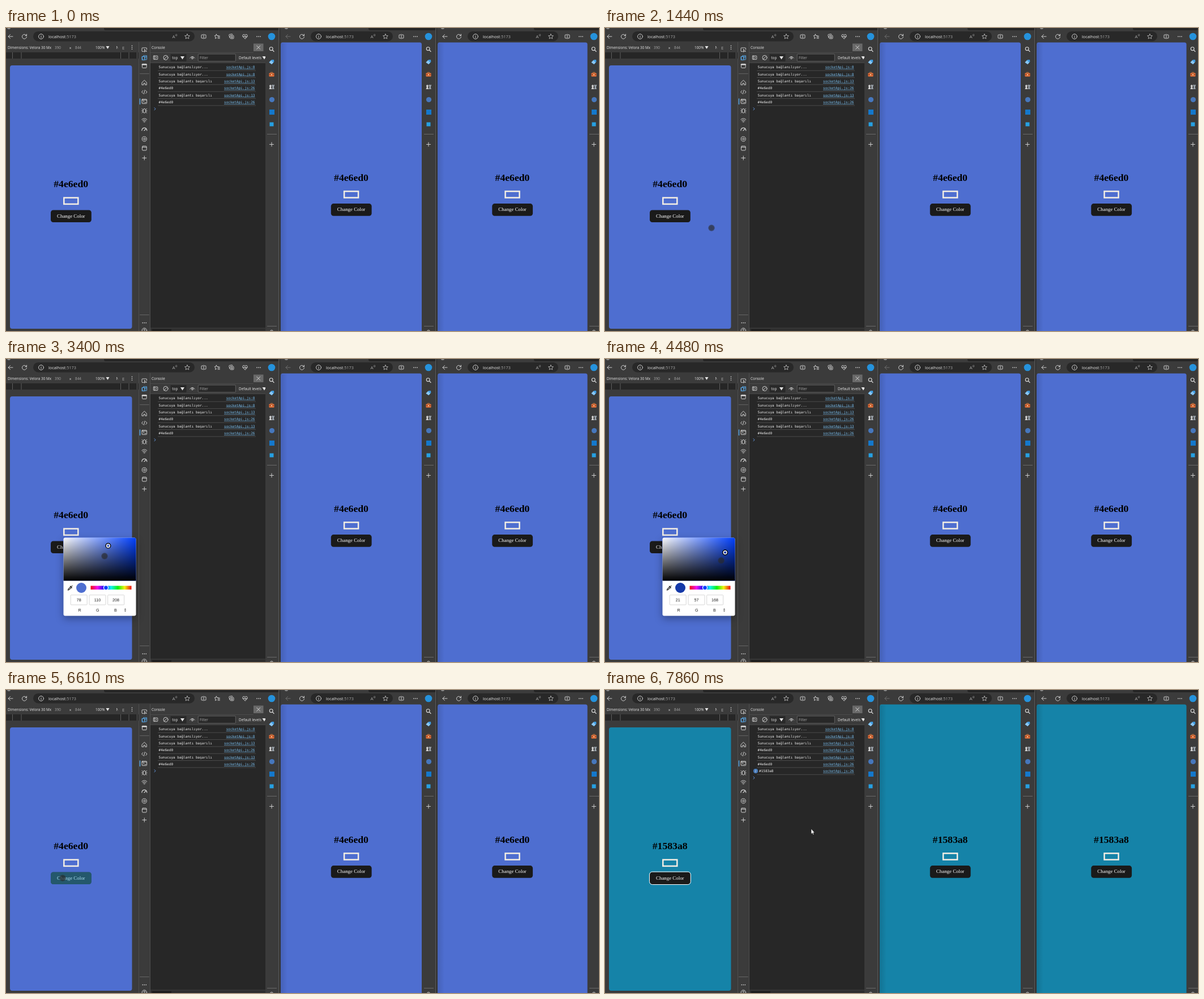
Recreate the animation shown at these times as an HTML page. Size 1047x535 px, loop 8 s.

```html
<!DOCTYPE html>
<html lang="en">
<head>
<meta charset="utf-8">
<title>Shared colour demo</title>
<style>
  html, body { margin: 0; width: 100%; height: 100%; overflow: hidden; background: #3b3b3b; }
  svg { display: block; width: 100vw; height: 100vh; --page: #4e6ed0; }
  text { white-space: pre; }
  .ui { font-family: "Open Sans", "Noto Sans", sans-serif; font-size: 6.4px; fill: #e8e8e8; }
  .url { font-size: 7.25px; }
  .dim { fill: #a6a6a6; }
  .mono { font-family: "DejaVu Sans Mono", monospace; font-size: 6.04px; fill: #f0f0f0; }
  .link { fill: #7cc0f0; text-decoration: underline; }
  .serif { font-family: "Liberation Serif", serif; text-anchor: middle; }
  .hex { font-size: 17.7px; font-weight: bold; }
  .label { font-size: 8.87px; fill: #fff; }
  .num { font-family: "Liberation Sans", sans-serif; font-size: 7.2px; text-anchor: middle; fill: #222; }
  .line { fill: none; stroke: #dcdcdc; stroke-width: .9; stroke-linecap: round; stroke-linejoin: round; }
  .page { fill: var(--page); }
  #picker { filter: drop-shadow(0 5px 7px rgba(0, 0, 0, .32)); }
</style>
</head>
<body>
<svg viewBox="0 0 1047 535" preserveAspectRatio="none">
  <defs>
    <linearGradient id="white"><stop stop-color="#fff"/><stop offset="1" stop-color="#fff" stop-opacity="0"/></linearGradient>
    <linearGradient id="black" x2="0" y2="1"><stop stop-opacity="0"/><stop offset="1"/></linearGradient>
    <linearGradient id="edge"><stop stop-opacity=".12"/><stop offset="1" stop-opacity="0"/></linearGradient>
    <linearGradient id="hues"></linearGradient>
    <radialGradient id="dot"><stop stop-color="#282828" stop-opacity=".7"/><stop offset=".75" stop-color="#282828" stop-opacity=".64"/><stop offset="1" stop-color="#282828" stop-opacity=".2"/></radialGradient>
    <clipPath id="top"><path d="M101.5 391.5V318.5a3 3 0 0 1 3-3H226.5a3 3 0 0 1 3 3V391.5Z"/></clipPath>
    <clipPath id="dims"><path d="M0 25H80V44H0Z"/></clipPath>
    <clipPath id="levels"><path d="M405 44H458V61H405Z"/></clipPath>
    <clipPath id="mode"><path d="M194 25H197.5V44H194Z"/></clipPath>

    <g id="back" class="line"><path d="M4 0H-4M-.5-3.5L-4 0L-.5 3.5"/></g>
    <g id="reload" class="line"><path d="M3.6-1.6A4 4 0 1 0 4 .6M4-4V-1.4H1.4"/></g>
    <g id="info" class="line"><circle r="4.4"/><path d="M0-.4V2.2M0-2.1V-2"/></g>
    <g id="read"><text class="ui dim" x="-4" y="3" style="font-size:8px">A</text><path class="line" d="M2-3.5q1 1 0 2.2M3.6-4.2q1.5 1.6 0 3.5" style="stroke:#a6a6a6;stroke-width:.7"/></g>
    <g id="star" class="line" style="stroke:#b4b4b4"><path d="M0-4.4L1.3-1.6L4.4-1.3L2.1.8L2.8 3.9L0 2.3L-2.8 3.9L-2.1.8L-4.4-1.3L-1.3-1.6Z"/></g>
    <g id="split" class="line"><path d="M0-4V4M-1.4-3H-3.2q-.8 0-.8.8V2.2q0 .8.8.8H-1.4M1.4-3H3.2q.8 0 .8.8V2.2q0 .8-.8.8H1.4"/></g>
    <g id="favs" class="line"><path d="M2-1.3L-.6-1.6L-1.6-4.2L-2.6-1.6L-4.6-1.3L-3 .8L-3.4 3.6L-1.4 2.4M1.6-.8H4.4M1 1.2H4.4M1 3.2H4.4"/></g>
    <g id="stack" class="line"><rect x="-2" y="-1.8" width="6" height="5.6" rx="1"/><path d="M-3.2 2L-4.2-2.6q-.1-.8.6-1L1-4.4q.8 0 1 1M1-.4V2.6M-.5 1.1H2.5"/></g>
    <g id="heart" class="line"><path d="M0 4L-3.6.2Q-5-2-3.2-3.4Q-1.2-4.4 0-2.4Q1.2-4.4 3.2-3.4Q5-2 3.6.2ZM-4 .2H-1L0-1.4L1 1.6L1.8.2H4"/></g>
    <g id="dots" fill="#e0e0e0"><circle cx="-3" r=".85"/><circle r=".85"/><circle cx="3" r=".85"/></g>
    <g id="plus" class="line"><path d="M-3.5 0H3.5M0-3.5V3.5"/></g>
    <g id="find" class="line"><circle cx="-.8" cy="-.8" r="2.9" stroke-width="1.1"/><path d="M1.4 1.4L4 4" stroke-width="1.2"/></g>
    <g id="tag"><path d="M-4.5 1L0-3.6L4-3.8L4.4 0L.2 4.2Z" fill="#3f9be0"/><path d="M-4.5 1L-1-2.6L3 1.4L.2 4.2Z" fill="#8cc8f4"/></g>
    <g id="tools"><path d="M-1.8-2.2V-3.6H1.8V-2.2" fill="none" stroke="#c8733a"/><rect x="-4.6" y="-2.4" width="9.2" height="6.2" rx="1" fill="#e0703a"/><path d="M-4.6.4H4.6" stroke="#8c3418"/><rect x="-1" y="-.4" width="2" height="1.8" fill="#f4d0a0"/></g>
    <g id="chess"><path d="M-4.6 4H.4L-.8 1.2V-.4A1.9 1.9 0 1 0-3.4-.4V1.2Z" fill="#d0d0d0"/><path d="M.4 3.8H4.8L4 1V-1.4H4.8V-4H3.4V-3.2H2.4V-4H.6V-1.4H1.4V1Z" fill="#9aa2aa"/></g>

    <g id="page">
      <text class="serif hex" x="114.7" y="281">#4e6ed0</text>
      <rect id="well" class="page" x="102.3" y="299.7" width="25" height="11.2" stroke="#f3eee4" stroke-width="2.5"/>
      <rect x="79" y="321.4" width="71.8" height="21.7" rx="4.5" fill="#1a1a1a"/>
      <text class="serif label" x="114.8" y="334.8">Change Color</text>
    </g>
  </defs>

  <rect width="1047" height="535" fill="#3b3b3b"/>
  <g id="windows"></g>

  <!-- device view -->
  <rect y="43" width="234" height="11" fill="#262626"/>
  <path d="M11.5 43V54M27 43V54M202.500 43V54M217 43V54M231.500 43V54" stroke="#777" stroke-width=".7"/>
  <g class="ui">
    <text x="3" y="37" clip-path="url(#dims)">Dimensions: Velora 30 Mx</text>
    <text class="dim" x="86" y="37">390</text><text x="111.800" y="37.500">×</text><text class="dim" x="122" y="37">844</text>
    <text x="158" y="37">100%</text><path d="M176.500 32H182.500L179.500 37Z"/>
    <g clip-path="url(#mode)"><text x="194.500" y="37">N</text></g><text class="dim" x="205" y="37.500" style="font-size:8px">E</text>
    <circle cx="222.500" cy="31.200" r=".8"/><circle cx="222.500" cy="34.200" r=".8"/><circle cx="222.500" cy="37.200" r=".8"/>
  </g>
  <rect class="page" x="7" y="66" width="215.500" height="465" rx="4"/>
  <use href="#page"/>
  <rect id="tap" x="79" y="321.400" width="71.800" height="21.700" rx="4.500" fill="#33b5e5" fill-opacity=".4"/>
  <rect id="focus" x="78.500" y="321" width="72.800" height="22.500" rx="5" fill="none" stroke="#fff" stroke-width="1"/>

  <!-- colour picker -->
  <g id="picker">
    <rect x="101.500" y="315.500" width="128" height="138" rx="3" fill="#fff"/>
    <g clip-path="url(#top)">
      <rect id="hueFill" x="101" y="315" width="129" height="77"/>
      <rect x="101" y="315" width="129" height="77" fill="url(#white)"/>
      <rect x="101" y="315" width="129" height="77" fill="url(#black)"/>
    </g>
    <g id="knob" fill="none"><circle class="ring" r="4.200" stroke="#000" stroke-width="1.600"/><circle r="2.900" stroke="#fff" stroke-width="1.400"/></g>
    <path d="M109.500 408L110 406L114 402L115.400 403.400L111.400 407.400ZM113.400 401L116.400 404M115 402.200L117 400.400" fill="none" stroke="#222" stroke-width="1.100" stroke-linecap="round"/>
    <circle id="swatch" cx="133" cy="404" r="9"/>
    <rect x="149.500" y="400.500" width="72" height="6.600" fill="url(#hues)"/>
    <g id="hueKnob"><circle class="ring" r="5.700" fill="#000"/><circle r="4" stroke="#fff" stroke-width="1.300"/></g>
    <g fill="#fff" stroke="#ccc" stroke-width=".8"><rect x="114.200" y="416.700" width="29" height="17.300" rx="1"/><rect x="147" y="416.700" width="29" height="17.300" rx="1"/><rect x="179.700" y="416.700" width="29" height="17.300" rx="1"/></g>
    <g class="num">
      <text class="rgb" x="128.700" y="428">78</text><text class="rgb" x="161.500" y="428">110</text><text class="rgb" x="194" y="428">208</text>
      <text x="130" y="446">R</text><text x="161.700" y="446">G</text><text x="193.500" y="446">B</text>
    </g>
    <path d="M208.800 442.500L210.500 440.600L212.200 442.500ZM208.800 444.200L210.500 446.100L212.200 444.200Z" fill="#333"/>
  </g>

  <!-- developer tools -->
  <path d="M234.500 25V535M254.500 25V535" stroke="#555" stroke-width=".8"/>
  <g class="line">
    <path d="M243 41.500H241q-1 0-1-1V36q0-1 1-1H247.500q1 0 1 1V38M244.500 38V42.500L245.800 41.200H248Z"/>
    <g stroke="#5ab0f5"><path d="M242 55H240.500V50.500H242.500V48.800H248.500V53"/><rect x="245" y="51" width="3.500" height="5" rx=".6"/><path d="M240.500 50.500H245V56.500H240.500Z"/></g>
    <rect x="240.500" y="63.500" width="7.600" height="7" rx="1"/><path d="M240.500 64.500H248" stroke-width="2"/>
    <path d="M236.500 80.700H252.500M236.500 506.500H252.500" stroke="#777" stroke-width=".7"/>
    <path d="M240.300 96L244.300 92.200L248.300 96V100.400H245.600V97.600H243V100.400H240.300Z"/>
    <path d="M241.800 110.500L239.600 113L241.800 115.500M246.800 110.500L249 113L246.800 115.500M245.200 109.500L243.400 116.500"/>
    <path d="M236.500 125V134.500" stroke="#5ab0f5" stroke-width="1.400"/>
    <rect x="240" y="125.800" width="8.600" height="7.600" rx="1"/><path d="M242 128L243.600 129.600L242 131.200M245 131.400H247M240 127.200H248.600"/>
    <rect x="242" y="142.600" width="4.600" height="7.400" rx="2.300"/><path d="M242 144.500L240 142.500M242 146.300H239.600M242 148L240 150M246.600 144.500L248.600 142.500M246.600 146.300H249M246.600 148L248.600 150"/>
    <path d="M239.800 161.600Q244.300 157.600 248.800 161.600M241.300 163.400Q244.300 160.800 247.300 163.400M242.800 165.200Q244.300 164 245.800 165.200M244.300 166.400V166.500"/>
    <path d="M239.800 181Q240.300 176.400 244.300 176.400Q248.300 176.400 248.800 181M244 181L247 178.400" stroke-width="1.200"/>
    <path d="M242.600 192H246L248.200 194V197.800L246 200H242.600L240.400 197.800V194Z"/><circle cx="244.300" cy="196" r="1.600"/>
    <rect x="240.500" y="208.500" width="7.600" height="7.600" rx="1.300"/><path d="M240.500 210.500H248"/>
    <circle cx="244.300" cy="534" r="4.200"/><path d="M243 533q0-1.500 1.300-1.500t1.300 1.300-1.300 1.400"/>
  </g>
  <use href="#plus" x="244.300" y="229.500"/><use href="#dots" x="244.300" y="520.500"/>

  <rect x="255" y="61.500" width="203" height="468.500" fill="#272727"/>
  <path d="M255 61.500H458M255 43.500H437M255 530H458" stroke="#525252" stroke-width=".7"/>
  <rect x="255" y="530.500" width="203" height="5" fill="#2d2d2d"/><rect x="258" y="531.800" width="34" height="4" fill="#1c1c1c"/>
  <rect x="437" y="27.500" width="17.500" height="13.500" fill="#696969"/>
  <path class="line" d="M442.700 31.300L448.700 37.300M448.700 31.300L442.700 37.300" stroke-width=".7"/>
  <rect x="290.500" y="46" width="28" height="13" rx="1" fill="#292929"/>
  <rect x="339.300" y="46" width="66" height="12.800" rx="1" fill="#282828" stroke="#777" stroke-width=".7"/>
  <g class="line">
    <rect x="260.400" y="49.200" width="7.400" height="6.200" rx=".6"/><path d="M262.400 49.500V55M264.500 51L266 52.300L264.500 53.600"/>
    <circle cx="282" cy="52.300" r="4"/><path d="M279.200 55.100L284.800 49.500"/>
    <path d="M324.800 53Q329 47.600 333.200 53"/><circle cx="329" cy="53.200" r="1.500"/>
  </g>
  <g class="ui">
    <text x="257" y="37">Console</text><text x="293.300" y="55">top</text><path d="M308 50H315L311.500 55.500Z"/>
    <text class="dim" x="342" y="55">Filter</text>
    <g clip-path="url(#levels)"><text x="411" y="55">Default levels</text><path d="M452.500 50H459.500L456 55.500Z"/></g>
  </g>
  <g id="log" class="mono"></g>
  <path id="prompt" class="line" d="M262 140.700L264 142.800L262 144.900" style="stroke:#6aa5f5"/>

  <g id="touch"><circle r="6" fill="url(#dot)"/></g>
  <path id="arrow" d="M0 0V9.400L2.100 7.500L3.500 10.600L5 10L3.600 7H6.200Z" fill="#fff" stroke="#111" stroke-width=".6"/>
</svg>
<script>
const $ = id => document.getElementById(id);
const all = sel => [...document.querySelectorAll(sel)];
const use = (id, x, y) => `<use href="#${id}" x="${x}" y="${y}"/>`;
const rect = (x, y, w, h, fill, rx = 0) => `<rect x="${x}" y="${y}" width="${w}" height="${h}" rx="${rx}" fill="${fill}"/>`;

// left edge, back, url bar left and right, tab end, right edge, sidebar centre
const wins = [
  { x: 0, back: 8, bar: [48, 333], tab: 173, end: 482, side: 469, fav: 5, icons: { split: 349, favs: 373, stack: 398, heart: 422, dots: 446 } },
  { x: 484, back: 498, bar: [538, 683], tab: 640, end: 759, side: 746, fav: 495, page: [485, 249], icons: { split: 698, dots: 723 } },
  { x: 761, back: 775, bar: [815, 975], tab: 932, end: 1047, side: 1038, fav: 771, page: [762, 264.6], icons: { split: 991, dots: 1015 } }
];

function drawWindow(w, i) {
  const [a, b] = w.bar, s = w.side;
  let out = rect(w.tab, -4, w.end - w.tab, 8, '#252525', 3)
    + `<circle cx="${w.fav}" cy="-1" r="3.2" fill="#888"/>`
    + rect(a, 6, b - a, 17.4, '#282828', 8.7)
    + `<g opacity="${i === 1 ? .35 : 1}">${use('back', w.back, 15)}</g>`
    + use('reload', w.back + 24.5, 15) + use('info', a + 14, 15)
    + `<text class="ui url" x="${a + 27}" y="17.7">localhost<tspan class="dim">:5173</tspan></text>`
    + use('read', b - 35.5, 15) + use('star', b - 13, 15);
  for (const id in w.icons) out += use(id, w.icons[id], 15);
  out += `<circle cx="${s}" cy="15" r="6.3" fill="#2592dc"/>`;
  ['find', 'tag', 'tools', 'chess'].forEach((id, k) => out += use(id, s, 37.5 + k * 22.2));
  out += `<circle cx="${s + .5}" cy="126.500" r="4.600" fill="#4677bd"/>`
    + rect(s - 4, 144, 9, 9, '#1478cc') + rect(s - 3.5, 166.5, 7, 7, '#26a0e2')
    + `<path d="M${s - 8} 187.500h17M${s - 8} 526.500h17" stroke="#777" stroke-width=".8"/>`
    + use('plus', s, 205.5) + `<circle class="line" cx="${s}" cy="536" r="2.500"/>`;
  if (w.page) {
    const [x, width] = w.page;
    out += `<rect class="page" x="${x}" y="25.500" width="${width}" height="515" rx="3.500"/>`
      + rect(x, 27, 12, 508, 'url(#edge)') + use('page', [494.8, 779.3][i - 1], -11.3);
  }
  if (w.end < 1047) out += rect(w.end - .5, 0, 1.2, 535, '#686868') + rect(w.end + .7, 0, 1.2, 535, '#242424');
  return out;
}
$('windows').innerHTML = wins.map(drawWindow).join('');

const link = 'socketApi.js:';
const wait = 'Sunucuya bağlanılıyor...', ok = 'Sunucuya bağlantı başarılı';
const rows = [[wait, 8], [wait, 8], [ok, 13], ['#4e6ed0', 26], [ok, 13], ['#4e6ed0', 26], ['#1583a8', 26]];
$('log').innerHTML = rows.map(([msg, n], i) => {
  const y = 71.3 + i * 12.35, last = i === 6;
  const badge = last ? `<circle cx="266" cy="${y - 2.3}" r="4.100" fill="#4579b8"/><text x="264.300" y="${y - .2}" fill="#dde" style="font-size:5.500px">2</text>` : '';
  return `<g ${last ? 'id="newRow"' : ''}>${badge}<text x="${last ? 272 : 269.6}" y="${y}">${msg}</text>`
    + `<text class="link" x="439.500" y="${y}" text-anchor="end">${link}${n}</text>`
    + `<path d="M268 ${y + 3.9}H441" stroke="#555" stroke-width=".8"/></g>`;
}).join('');

$('hues').innerHTML = [0, 1, 2, 3, 4, 5, 6].map(i =>
  `<stop offset="${i / 6}" stop-color="hsl(${360 - i * 60},90%,50%)"/>`).join('');

// pointer moves: start, end, number of positions, then path points
const moves = [
  [380, 900, 9, [958, 403], [543, 319]],
  [1100, 1240, 3, [420, 331], [194, 355]],
  [1440, 2180, 12, [188, 353], [122, 315]],
  [2250, 2460, 4, [120, 313], [114, 306]],
  [3190, 3400, 4, [122, 311], [174, 348]],
  [3790, 4200, 7, [180, 346], [212.1, 341.6]],
  [4390, 4880, 8, [209, 348], [182, 402]],
  [5350, 5420, 2, [183, 402], [181, 404]],
  [5620, 6150, 9, [166, 392], [100, 332]],
  [7130, 7860, 12, [106, 323], [205, 195], [285, 154], [345, 195], [364, 245]]
];

function pointer(t) {
  const move = moves.filter(m => m[0] <= t).pop();
  if (!move) return null;
  const [start, end, n, ...pts] = move;
  const k = Math.min(n - 1, Math.floor((t - start) / (end - start) * (n - 1) + 1e-6));
  const at = k / (n - 1) * (pts.length - 1);
  const i = Math.min(Math.floor(at), pts.length - 2);
  return pts[i].map((v, axis) => v + (pts[i + 1][axis] - v) * (at - i));
}

function toRgb(h, s, v) {
  return [5, 3, 1].map(n => {
    const k = (n + h / 60) % 6;
    return Math.round(255 * v * (1 - s * Math.max(0, Math.min(k, 4 - k, 1))));
  });
}

const show = (el, on) => el.style.display = on ? '' : 'none';
const move = (el, [x, y]) => el.setAttribute('transform', `translate(${x} ${y})`);
const hexes = all('.hex'), fields = all('.rgb');
const svg = document.querySelector('svg');
const [svRing, hueRing] = all('.ring');
const hueDisc = $('hueKnob').lastElementChild;

function draw(t) {
  const sent = t >= 6690, open = t >= 2860 && t < 6410;
  const page = sent ? '#1583a8' : '#4e6ed0';
  svg.style.setProperty('--page', page);
  hexes.forEach(el => el.textContent = page);
  show($('newRow'), sent);
  move($('prompt'), [0, sent ? 12.3 : 0]);
  show($('tap'), t >= 6610 && t < 6750);
  show($('focus'), sent);

  const pos = pointer(t), touch = pos && pos[0] < 234;
  show($('touch'), touch);
  show($('arrow'), pos && !touch);
  if (pos) move($(touch ? 'touch' : 'arrow'), pos);

  show($('picker'), open);
  if (!open) return;
  const hue = t < 5150 ? 225.2 : 195.1;
  const knob = t < 3590 ? [180.4, 329.8] : t < 4390 ? pos : [212.1, 341.6];
  const rgb = toRgb(hue, (knob[0] - 101) / 127, 1 - (knob[1] - 316) / 75);
  const pure = `rgb(${toRgb(hue, 1, 1)})`;
  move($('knob'), knob);
  move($('hueKnob'), [149.5 + 72 * (1 - hue / 360), 403.8]);
  $('hueFill').setAttribute('fill', pure);
  hueDisc.setAttribute('fill', pure);
  $('swatch').setAttribute('fill', `rgb(${rgb})`);
  fields.forEach((el, i) => el.textContent = rgb[i]);
  show(svRing, t < 5150);
  show(hueRing, t >= 5150);
}

const begin = performance.now();
function tick() {
  draw((performance.now() - begin) % 8000);
  requestAnimationFrame(tick);
}
tick();
</script>
</body>
</html>
```
